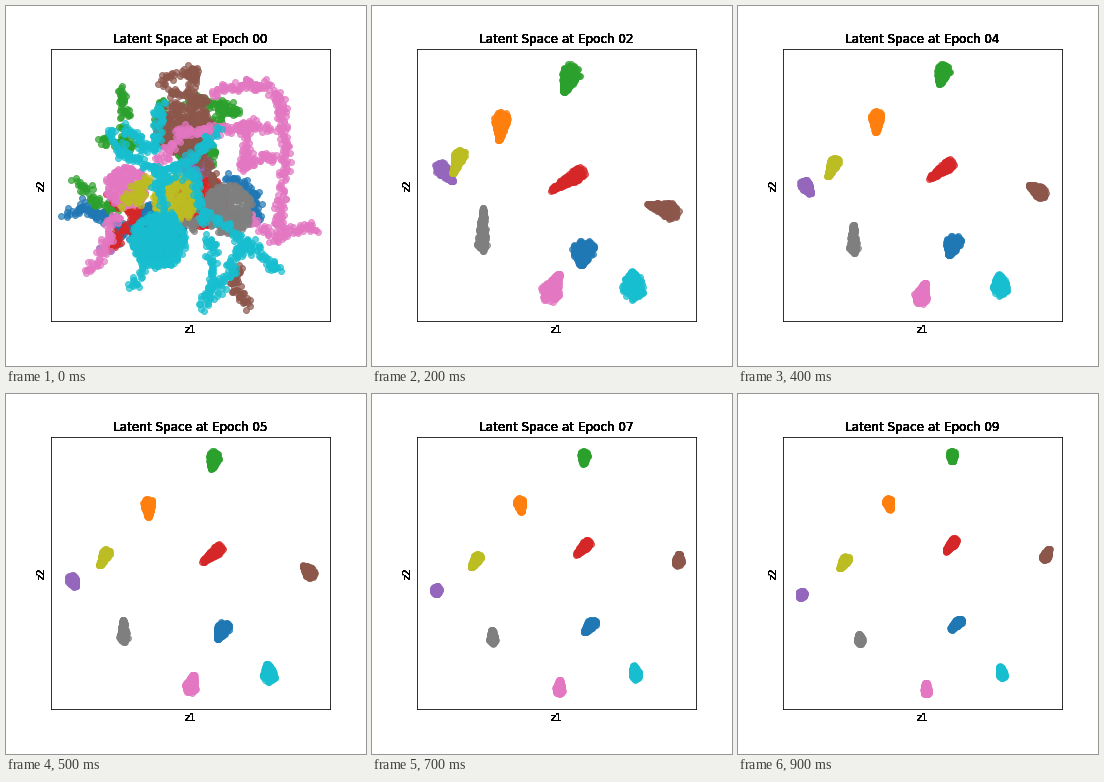
Write a matplotlib script that moves like this. It is 360 px wide and 360 px high and loops after 1 s.

```python
import numpy as np
import matplotlib.pyplot as plt
from matplotlib.animation import FuncAnimation

EPOCHS = 10
SETTLE = 2            # epoch from which every cluster is one compact blob
DOT_RADIUS = 3.5
FINAL_RADIUS = 7
LEFT, RIGHT, TOP, BOTTOM = 45, 324, 43.2, 315

classes = {}


def add_class(color, body, trails, band, start, end):
    """Key points in stage pixels, y down.

    body:   x, y, radius of the dense part before training
    trails: corner points of its wandering trails
    band:   width, then corner points of the ribbon after one epoch
    start, end: head and tail of the blob, start also with its radius
    """
    classes[color] = dict(body=body, trails=trails, band=band, start=start, end=end)


add_class("tab:blue", (150, 225, 28),
          [[(92, 209), (60, 207)], [(75, 198), (118, 228), (100, 243)],
           [(222, 173), (256, 190), (252, 215)]],
          (11, (193, 247), (208, 255), (228, 239), (251, 247)),
          ((211, 243), (209, 259), 15), ((221, 227), (213, 235)))
add_class("tab:orange", (182, 130, 14), [],
          (8, (99, 101), (126, 101), (138, 126), (134, 137), (142, 149)),
          ((129, 112), (127, 134), 11), ((150, 107), (152, 115)))
add_class("tab:green", (190, 150, 20),
          [[(115, 82), (121, 140)], [(95, 132), (128, 142)], [(72, 175), (108, 205)],
           [(185, 95), (232, 103), (205, 118)], [(155, 97), (150, 120)]],
          (10, (117, 103), (108, 85), (112, 62), (148, 73)),
          ((199, 67), (192, 86), 13), ((214, 60), (214, 67)))
add_class("tab:red", (195, 195, 26),
          [[(100, 190), (125, 205), (105, 242)], [(185, 125), (190, 150)]],
          (13, (167, 186), (200, 184)),
          ((207, 167), (179, 184), 10), ((216, 147), (208, 157)))
add_class("tab:purple", (190, 160, 14), [],
          (6, (60, 138), (76, 142), (97, 157)),
          ((69, 162), (80, 175), 10), ((64, 200), (62, 203)))
add_class("tab:brown", (178, 122, 28),
          [[(155, 78), (183, 60), (190, 100)], [(165, 85), (200, 95)],
           [(195, 130), (210, 175), (215, 205)], [(235, 262), (226, 288), (242, 299)]],
          (11, (247, 223), (262, 234), (290, 235), (306, 228)),
          ((300, 205), (276, 198), 12), ((307, 163), (311, 155)))
add_class("tab:pink", (120, 180, 21),
          [[(207, 87), (235, 78), (265, 88), (278, 145), (270, 200), (275, 222)],
           [(225, 208), (270, 228), (311, 221)], [(265, 125), (230, 115), (235, 165), (268, 150)],
           [(150, 160), (180, 132), (230, 122)], [(115, 210), (80, 266)]],
          (9, (197, 254), (208, 263), (174, 267), (208, 284), (227, 290)),
          ((177, 288), (187, 268), 14), ((188, 298), (188, 289)))
add_class("tab:gray", (222, 203, 25), [[(195, 215), (165, 215)]],
          (8, (110, 181), (126, 230), (140, 230), (154, 214)),
          ((110, 240), (111, 202), 9), ((122, 247), (121, 241)))
add_class("tab:olive", (170, 192, 23), [[(118, 198), (122, 180), (140, 178), (130, 198)]],
          (7, (95, 128), (74, 134), (80, 152)),
          ((88, 148), (81, 167), 9), ((108, 165), (102, 174)))
add_class("tab:cyan", (152, 235, 28),
          [[(165, 215), (155, 160), (125, 150), (102, 125)], [(115, 120), (150, 140), (155, 98)],
           [(150, 165), (185, 155), (212, 123)], [(160, 175), (185, 170), (195, 215)],
           [(150, 250), (125, 278)], [(205, 230), (195, 302)],
           [(195, 205), (245, 235), (273, 263)], [(245, 238), (213, 290)]],
          (13, (292, 275), (257, 260), (257, 285), (275, 295)),
          ((261, 282), (260, 266), 16), ((264, 281), (262, 273)))


def disc(count, radius, rng):
    angle = rng.uniform(0, 2 * np.pi, count)
    reach = radius * np.sqrt(rng.random(count))
    return np.column_stack((reach * np.cos(angle), reach * np.sin(angle)))


def along(corners, t):
    """Points at fractions t of the length of a polyline."""
    x, y = np.array(corners, float).T
    where = np.insert(np.cumsum(np.hypot(np.diff(x), np.diff(y))), 0, 0)
    return np.column_stack([np.interp(t * where[-1], where, v) for v in (x, y)])


def wander(corners, rng):
    """Random walk that is tied to the ends of a polyline."""
    length = np.hypot(*np.diff(corners, axis=0).T).sum()
    t = np.linspace(0, 1, int(length * 1.1))
    walk = np.cumsum(rng.normal(0, 0.9, (len(t), 2)), axis=0)
    walk -= t[:, None] * walk[-1]
    return along(corners, t) + walk + rng.normal(0, 2.6, walk.shape)


def tangle(body, trails, rng):
    x, y, radius = body
    parts = [disc(int(radius ** 2 * 0.5), radius, rng) + (x, y)]
    return np.concatenate(parts + [wander(corners, rng) for corners in trails])


def ribbon(band, rng, count=320):
    width, *corners = band
    t = rng.random(count)
    taper = 0.6 + 0.4 * np.sin(np.pi * t)
    return along(corners, t) + disc(count, np.maximum(width * taper - DOT_RADIUS, 1), rng)


def blob(start, end, epoch, rng, count=260):
    """A round head with a narrowing tail, easing to its final place and size."""
    progress = (epoch - SETTLE) / (EPOCHS - 1 - SETTLE)
    eased = 1 - (1 - progress) ** 1.7
    first, last = np.array(start[:2], float), np.array(end, float)
    axis = first + (last - first) * eased
    radius = start[2] + (FINAL_RADIUS - start[2]) * eased - DOT_RADIUS
    t = rng.random(count) ** 1.6
    return along(axis, t) + disc(count, radius + (1 - radius) * t, rng)


def dots(color, epoch):
    shape = classes[color]
    rng = np.random.default_rng(list(classes).index(color))
    if epoch == 0:
        return tangle(shape["body"], shape["trails"], rng)
    if epoch < SETTLE:
        return ribbon(shape["band"], rng)
    return blob(shape["start"], shape["end"], epoch, rng)


def heavy_text(x, y, text, **style):
    """Overprinted text, which gives the dark, hard-edged lettering."""
    return [ax.text(x, y, text, **style) for _ in range(10)]


plt.rcParams["font.family"] = "DejaVu Sans"
fig, ax = plt.subplots(figsize=(5, 5), dpi=72, facecolor="white")
fig.subplots_adjust(left=0.125, right=0.9, bottom=0.125, top=0.88)
ax.set(xlim=(LEFT, RIGHT), ylim=(BOTTOM, TOP), xticks=[], yticks=[])

mid_x, mid_y = (LEFT + RIGHT) / 2, (TOP + BOTTOM) / 2
titles = heavy_text(mid_x, TOP - 6, "", ha="center", va="baseline", size=12)
heavy_text(mid_x, BOTTOM + 4, "z1", ha="center", va="top", size=10)
heavy_text(LEFT - 4, mid_y, "z2", ha="right", va="center", rotation=90, size=10)
clouds = {color: ax.scatter([], [], s=36, color=color, alpha=0.7) for color in classes}


def update(epoch):
    for title in titles:
        title.set_text(f"Latent Space at Epoch {epoch:02d}")
    for color, cloud in clouds.items():
        cloud.set_offsets(dots(color, epoch))
    return [*titles, *clouds.values()]


animation = FuncAnimation(fig, update, frames=EPOCHS, interval=100, repeat=True)
plt.show()
```
